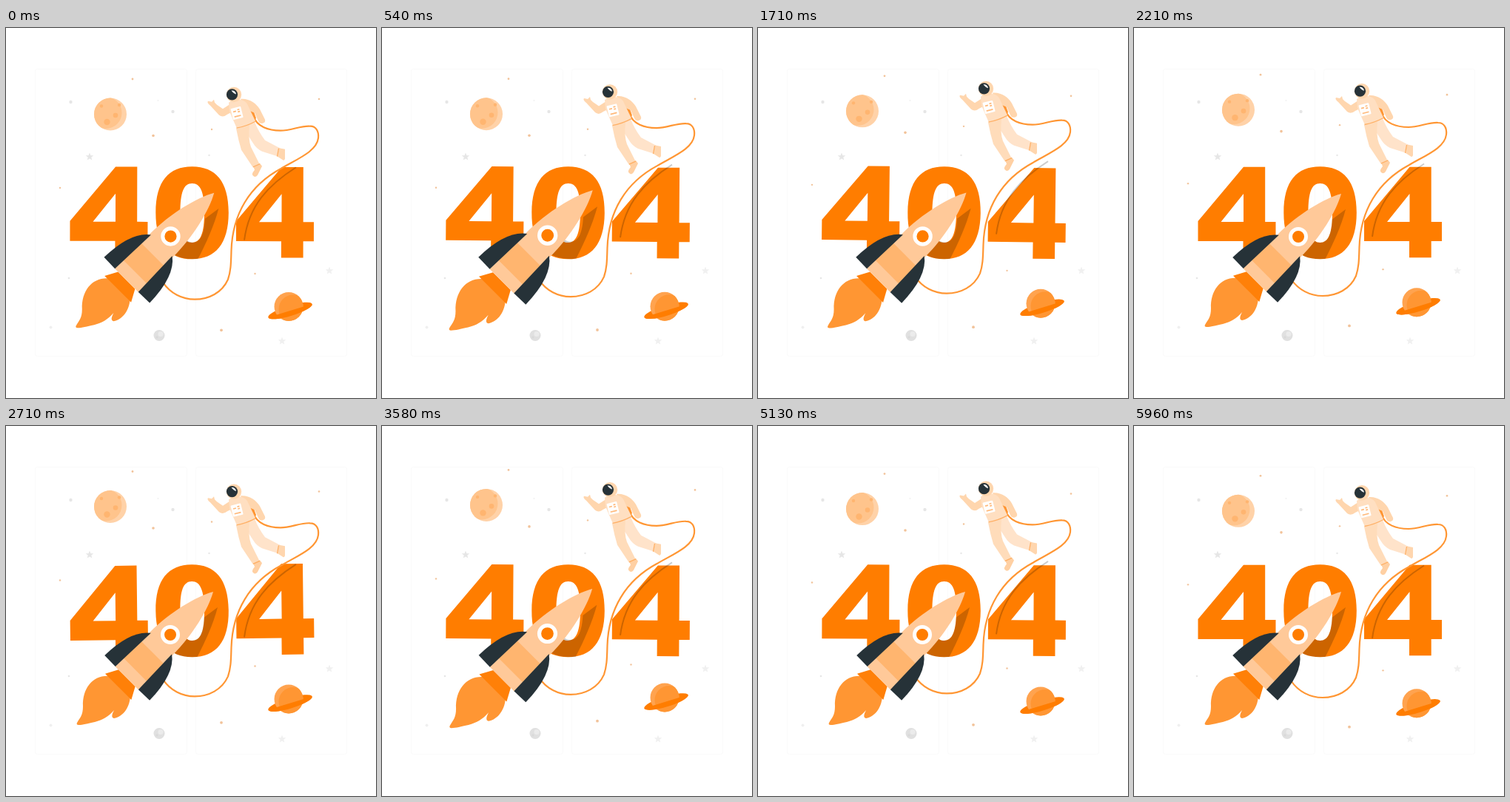
Recreate the animation shown at these times as an HTML page. Size 500x500 px, loop 6000 ms.

```html
<!DOCTYPE html>
<html lang="en">
<head>
<meta charset="utf-8">
<title>404</title>
<style>
  html, body { margin: 0; width: 100%; height: 100%; overflow: hidden; background: #fff; }
  svg { display: block; width: 100%; height: 100%; }
</style>
</head>
<body>
<svg viewBox="0 0 500 500" role="img" aria-label="404">
  <defs>
    <path id="zero" d="M251.500 187.300C283 187.300 300.800 207 300.800 249.500S283 312.300 251.500 312.300S202.300 292 202.300 249.500S220 187.300 251.500 187.300ZM251.500 210C240 210 235.500 222 235.500 249.500S240 290 251.500 290S268 277 268 249.500S263 210 251.500 210Z" fill-rule="evenodd" clip-rule="evenodd"/>
    <path id="four" d="M148 187.700H177.200V262H191.500V288H177.200V310.300H147.500V288H86.500V261ZM148 224L117.500 262H148Z" fill-rule="evenodd"/>
    <path id="star" d="M0-5.500L1.500-1.800L5.300-1.700L2.300.8L3.300 4.500L0 2.400L-3.300 4.500L-2.300.8L-5.300-1.700L-1.500-1.800Z"/>
    <path id="fin" d="M-20 99Q-42 115-43 164.500L-22 165Z"/>
    <clipPath id="onZero"><use href="#zero"/></clipPath>
    <clipPath id="moonClip"><circle cx="141" cy="116.500" r="22"/></clipPath>
    <clipPath id="planetClip"><circle cx="382" cy="376.500" r="19.500"/></clipPath>
  </defs>

  <g fill="#fff" stroke="#fafafa">
    <rect x="39.500" y="55.500" width="205" height="388" rx="3"/>
    <rect x="256.500" y="55.500" width="204" height="388" rx="3"/>
  </g>

  <g fill="#e6e6e6">
    <use href="#star" x="113" y="174"/>
    <use href="#star" x="437" y="328" fill="#f0f0f0"/>
    <use href="#star" x="373" y="423" fill="#f0f0f0"/>
    <circle cx="87.500" cy="100" r="2.200"/>
    <circle cx="225.500" cy="113" r="2.200"/>
    <circle cx="85" cy="338" r="1.300"/>
    <circle cx="60.500" cy="404.500" r="2" fill="#f0f0f0"/>
    <circle cx="205.500" cy="98" r="1" fill="#f0f0f0"/>
    <circle cx="274.500" cy="172" r="1.200"/>
    <circle cx="207" cy="415.500" r="7.500" fill="#e0e0e0"/>
    <circle cx="209" cy="413.500" r="3.500" fill="#ebebeb"/>
    <circle cx="204" cy="418" r="1.800" fill="#d9d9d9"/>
  </g>

  <g id="sky">
    <circle cx="141" cy="116.500" r="22" fill="#ffd2a8"/>
    <g clip-path="url(#moonClip)">
      <circle cx="135" cy="114.500" r="21.500" fill="#ffc48c"/>
    </g>
    <g fill="#ffb570">
      <circle cx="129" cy="105.500" r="2.200"/>
      <circle cx="153" cy="104" r="2.200"/>
      <circle cx="148" cy="118" r="3.300"/>
      <circle cx="136.500" cy="127" r="4.200"/>
    </g>
    <g id="planet">
      <ellipse cx="384" cy="382" rx="31" ry="7" transform="rotate(-17 384 382)" fill="#ff7d00"/>
      <circle cx="382" cy="376.500" r="19.500" fill="#ffa34f"/>
      <g clip-path="url(#planetClip)">
        <circle cx="388" cy="380" r="19.500" fill="#ff9633"/>
      </g>
      <path d="M-31 0A31 7 0 0 0 31 0Z" transform="translate(384 382) rotate(-17)" fill="#ff7d00"/>
    </g>
    <g id="dots" fill="#f2c39a"></g>
  </g>

  <g id="digits" fill="#ff7d00">
    <use href="#four"/>
    <use href="#zero"/>
    <use href="#four" x="224.500"/>
  </g>

  <g id="floater">
    <path d="M392 188.500C355 212 328 240 322 287" fill="none" stroke="#000" stroke-opacity=".2" stroke-width="2"/>
    <path d="M334 119C339 134 355 139 371 139C385 139 399 132 411 133C419 133 423 140 422 149C420 167 394 177 372 190C329 213 306 252 304.500 301C304 318 304 328 300 340C292 358 274 367 255 367C238 367 222 359 212 344" fill="none" stroke="#ff9633" stroke-width="2.200"/>

    <path d="M328 108L334 111L338 122L335 127L330 124Z" fill="#ff9633"/>
    <path d="M317 96C329 95 338 102 343 110L350 124Q351 128 347 129Q343 130 341 126L336 115L322 109Z" fill="#ffd6ae"/>
    <path d="M319 133L336 127Q341 140 350 152L371 163L368 174L346 167Q338 163 334 156Z" fill="#ffe3ca"/>
    <path d="M369 162.500L377 164L377 177Q376 180 374 178.500L367 174Z" fill="#ffd6ae"/>
    <path d="M311 136L329 131Q327 150 331 161L343 185L334 189L318 165Q314 152 311 136Z" fill="#ffdcba"/>
    <path d="M334 187L343 183L346 187L340 199Q337 203 334 200Q331 198 336 192Z" fill="#ffd0a3"/>
    <path d="M303 103L293 109.500L285 104L282 101L281 97L278 100L273 99Q271 101 276 105L288 118Q293 122 299 117L307 113Z" fill="#ffd6ae"/>
    <path d="M301 101C308 96 321 95 326 103L337 126Q326 134 312 136L302 113Z" fill="#ffdfc1"/>
    <path d="M311.500 135.500Q325 133 337 126.500M334 188L343 184M368.500 163L366.500 174" fill="none" stroke="#ffb066" stroke-width="1.300"/>
    <g transform="rotate(-14 312 115)">
      <rect x="305" y="107.500" width="14" height="15.500" rx="1" fill="#fff"/>
      <path d="M307.500 112.500H311.500M313.500 111H316.500M313.500 114H316.500M307.500 119.500H316.500" stroke="#ffb97a" stroke-width="1.700"/>
    </g>
    <circle cx="308" cy="90.300" r="10.200" fill="#ffd6ae"/>
    <circle cx="305.500" cy="90.200" r="7.600" fill="#263238"/>
    <path d="M304.500 84.700Q310 84.200 311 89.700Q308 89.200 304.500 84.700Z" fill="#fff"/>
  </g>

  <g id="rocket">
    <path d="M286 245C280 268 269 292 257 315H232L212 300Z" fill-opacity=".2" clip-path="url(#onZero)"/>
    <path d="M96 401C100 394 104 391 104 379C103 354 118 336 140 338L168 363C168 380 158 393 146 395C142 394 143 390 146 384C138 393 131 397 120 400C110 402 104 404 98 404C96 404 95 403 96 401Z" fill="#ff9633"/>
    <g transform="translate(280 224) rotate(45)">
      <path d="M-16 165H16L25 181.500H-25Z" fill="#ff8008"/>
      <path d="M0 0C12 21 21.800 61 21.800 99L22.300 165H-22.300L-21.800 99C-21.800 61-12 21 0 0Z" fill="#ffc999"/>
      <path d="M-22 116H22V149H-22Z" fill="#ffb56f"/>
      <g fill="#263238">
        <use href="#fin"/>
        <use href="#fin" transform="scale(-1 1)"/>
      </g>
      <circle cy="82" r="13" fill="#fff"/>
      <circle cy="82" r="8" fill="#ff7d00"/>
    </g>
  </g>
</svg>

<script>
  const LOOP = 6000, FPS = 24;
  const $ = id => document.getElementById(id);
  const move = (id, value) => $(id).setAttribute("transform", value);

  const dots = [[171, 69, 1.4], [73, 216, 1.2], [199, 145.5, 1.8], [423, 96, 1.3],
                [278, 137, 1.2], [336.5, 332, 1.2], [291, 408.3, 1.9]];
  $("dots").innerHTML = dots.map(([x, y, r]) => `<circle cx="${x}" cy="${y}" r="${r}"/>`).join("");

  // Linear interpolation through [position, value] stops
  function track(stops, p) {
    const i = Math.max(1, stops.findIndex(s => s[0] >= p));
    const [a, from] = stops[i - 1], [b, to] = stops[i];
    return from + (to - from) * (p - a) / (b - a);
  }
  const phase = (t, period) => (t / period) % 1;

  const FLOAT = [[0, 0], [.5, -10], [1, 0]];
  const SWAY = [[0, 0], [.25, 1], [.75, -1], [1, 0]];
  const BEAT = [[0, 1], [.1, 1.1], [.3, 1], [.4, 1], [.5, 1.1], [.6, 1], [1, 1]];

  function draw(ms) {
    const step = Math.floor(ms * FPS / 1000 + .13);
    const t = (step % (LOOP * FPS / 1000) + 1) / FPS;
    const size = track(BEAT, phase(t, 3));
    move("sky", `translate(0 ${track(FLOAT, phase(Math.max(0, t - .5), 6))})`);
    move("floater", `translate(0 ${track(FLOAT, phase(t, 3))})`);
    move("digits", `rotate(${track(SWAY, phase(t, 1.5))} 251 249.5)`);
    move("rocket", `translate(190 314) scale(${size}) translate(-190 -314)`);
  }

  const start = performance.now();
  function tick() {
    draw((performance.now() - start) % LOOP);
    requestAnimationFrame(tick);
  }
  tick();
</script>
</body>
</html>
```
